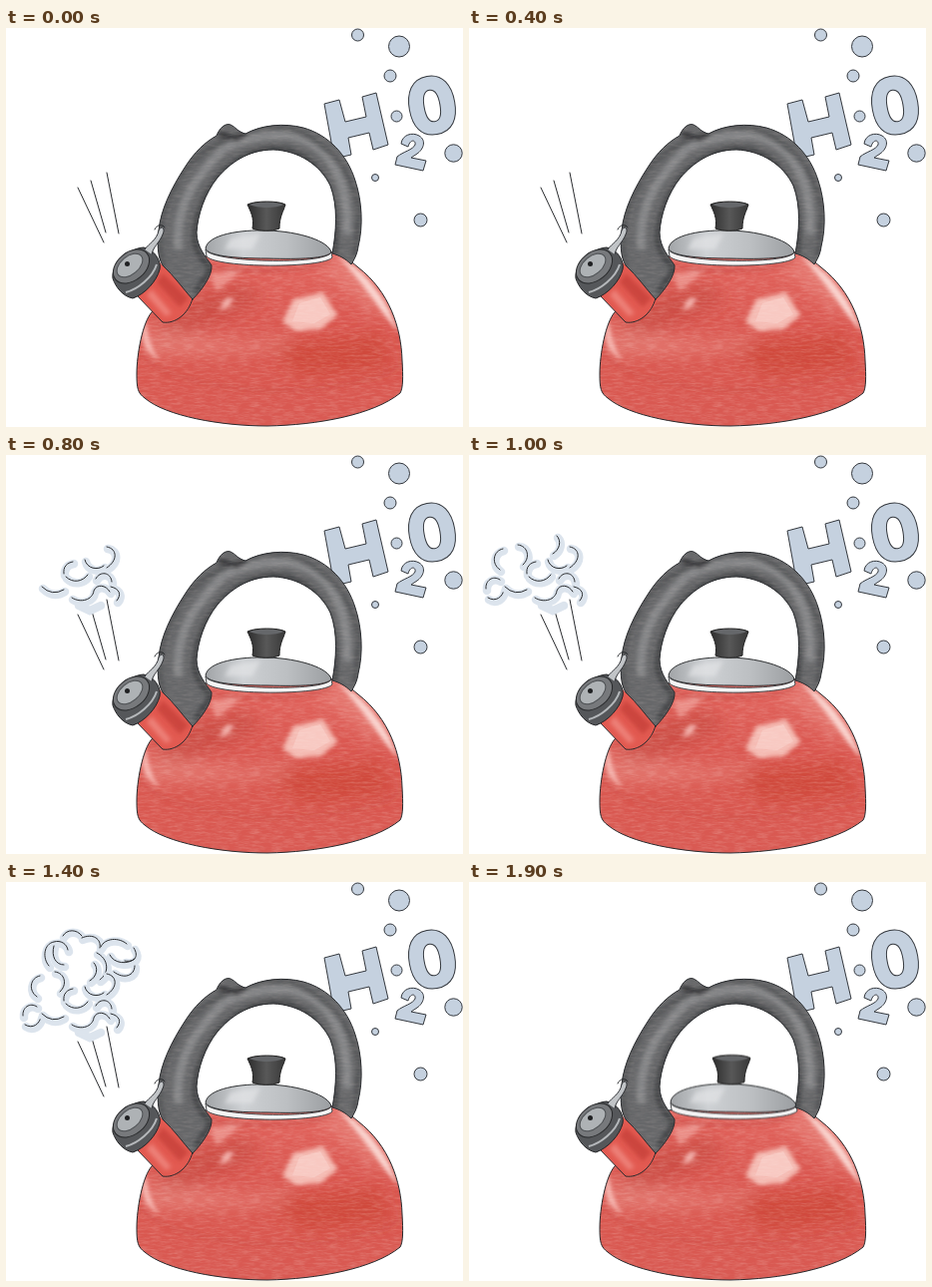
Write an HTML page that moves like this. It is 458x400 px and loops after 2 s.

```html
<!DOCTYPE html>
<html lang="en">
<head>
<meta charset="utf-8">
<title>Whistling kettle</title>
<style>
html, body { margin: 0; width: 100%; height: 100%; overflow: hidden; background: #fff; }
svg { display: block; width: 458px; height: 400px; }
.ink { fill: none; stroke: #292b2e; stroke-width: 1; stroke-linecap: round; stroke-linejoin: round; }
.water { fill: #c5d1df; stroke: #34383e; stroke-width: 1; stroke-linejoin: round; }
.puff { fill: none; stroke: #dce4ed; stroke-width: 8.5; stroke-linecap: round; }
.soft { filter: url(#soft); }
.mid { filter: url(#mid); }
.jets, .s1, .s2, .s3, .lid { animation: 2s step-end infinite; }
.jets { animation-name: jets; }
.s1 { animation-name: s1; }
.s2 { animation-name: s2; }
.s3 { animation-name: s3; }
.lid { animation-name: rattle; }
@keyframes jets { 0% { opacity: 1 } 80%, 100% { opacity: 0 } }
@keyframes s1 { 0% { opacity: 0 } 30% { opacity: 1 } 80%, 100% { opacity: 0 } }
@keyframes s2 { 0% { opacity: 0 } 50% { opacity: 1 } 80%, 100% { opacity: 0 } }
@keyframes s3 { 0% { opacity: 0 } 65% { opacity: 1 } 80%, 100% { opacity: 0 } }
@keyframes rattle { 0% { transform: none } 80%, 100% { transform: translate(2px, -.5px) } }
</style>
</head>
<body>
<svg viewBox="0 0 458 400">
<defs>
  <filter id="soft" x="-50%" y="-50%" width="200%" height="200%"><feGaussianBlur stdDeviation="8"/></filter>
  <filter id="mid" x="-50%" y="-50%" width="200%" height="200%"><feGaussianBlur stdDeviation="2"/></filter>
  <!-- Fine watercolour grain -->
  <filter id="wash" x="0" y="0" width="100%" height="100%">
    <feTurbulence type="fractalNoise" baseFrequency=".09 .5" numOctaves="3" seed="4"/>
    <feColorMatrix values="0 0 0 0 1  0 0 0 0 .85  0 0 0 0 .8  1.6 0 0 0 -.6"/>
    <feComposite in2="SourceGraphic" operator="in"/>
  </filter>
  <linearGradient id="red" x1="0" y1="0" x2="0" y2="1">
    <stop offset="0" stop-color="#e2665f"/><stop offset=".4" stop-color="#da5750"/>
    <stop offset=".72" stop-color="#d9574f"/><stop offset="1" stop-color="#d95a53"/>
  </linearGradient>
  <linearGradient id="steel">
    <stop offset="0" stop-color="#a1a4a7"/><stop offset=".3" stop-color="#ced1d4"/>
    <stop offset=".65" stop-color="#bcbfc2"/><stop offset="1" stop-color="#9b9ea1"/>
  </linearGradient>
  <linearGradient id="knob">
    <stop offset="0" stop-color="#2d2d2d"/><stop offset=".5" stop-color="#585858"/><stop offset="1" stop-color="#383838"/>
  </linearGradient>
  <path id="body" d="M200 229C185 240 161 267 146 285C137 295 131 327 131 347C131 361 132 366 139 371C160 389 215 399 262 399C312 398 368 388 395 366C398 361 398 350 397 333C396 300 384 264 353 240C344 232 334 227 324 224Z"/>
  <path id="grip" d="M187 272C177 261 169 249 157 238C151 228 152 215 153 203C155 182 166 160 179 140C189 124 200 114 211 108C214 100 220 95 225 97C230 99 232 104 240 106C256 97 279 95 298 100C323 107 342 127 350 153C357 174 358 199 353 219C352 227 349 232 346 237C340 231 334 228 327 226C331 204 333 179 325 158C315 137 293 123 268 122C242 122 224 136 212 150C199 166 192 188 191 205C191 220 201 230 206 238C207 248 196 263 187 272Z"/>
  <clipPath id="bodyClip"><use href="#body"/></clipPath>
  <clipPath id="gripClip"><use href="#grip"/></clipPath>
  <g id="steam1">
    <path d="M36 132Q46 142 58 135"/><path d="M58 119C57 112 61 108 67 107"/>
    <path d="M60 122C67 129 77 127 82 120"/><path d="M79 105C81 114 92 116 98 111"/>
    <path d="M101 92C112 94 112 106 101 113"/><path d="M90 124C94 116 105 117 106 127"/>
    <path d="M66 143C75 149 87 145 88 136C91 129 100 130 104 137"/><path d="M105 132C114 134 116 140 111 146"/>
  </g>
  <g id="steam2">
    <path d="M34 94C24 96 22 109 31 115"/><path d="M49 90C59 91 62 103 54 110"/>
    <path d="M17 134C16 126 24 120 31 125"/><path d="M19 143C27 148 34 142 35 135"/>
    <path d="M88 81C93 86 91 95 84 99"/>
  </g>
  <g id="steam3">
    <path d="M57 54C61 47 71 47 76 54"/><path d="M43 84C36 76 38 62 48 60C55 58 61 62 62 68"/>
    <path d="M76 56C87 51 96 57 94 66"/><path d="M95 65C99 56 113 55 121 62"/>
    <path d="M128 66C134 75 128 81 119 79"/><path d="M104 73C108 82 122 83 129 77"/>
    <path d="M108 90C118 98 129 94 129 84"/><path d="M91 71C103 77 104 91 94 98"/>
    <path d="M48 64C45 75 50 83 58 83"/>
  </g>
</defs>

<g class="water" role="img" aria-label="H2O">
  <path d="M319 76L334 72L340 94L361 89L357 69L371 65L383 117L368 122L364 105L343 110L346 127L329 131Z"/>
  <path fill-rule="evenodd" transform="rotate(-10 427 78)" d="M427 48C443 48 450 61 450 78C450 95 443 107 427 107C411 107 404 95 404 78C404 61 411 48 427 48ZM427 62C421 62 419 69 419 78C419 88 421 94 427 94C433 94 435 88 435 78C435 69 433 62 427 62Z"/>
  <path d="M396 116C397 107 407 104 414 108C422 113 418 122 412 126L406 130L421 133L418 143L390 137L392 129C398 124 408 122 410 117C411 112 405 111 403 119Z"/>
  <circle cx="352.5" cy="7" r="6"/><circle cx="394" cy="18.5" r="10.5"/><circle cx="385" cy="48" r="6"/>
  <circle cx="391.5" cy="88.5" r="5.5"/><circle cx="370" cy="150" r="3.5"/>
  <circle cx="448.5" cy="125.5" r="8.7"/><circle cx="415.5" cy="192.5" r="6.5"/>
</g>

<use href="#body" fill="url(#red)"/>
<g clip-path="url(#bodyClip)">
  <g class="soft">
    <path fill="#c2423a" opacity=".55" d="M155 287C170 260 205 270 237 254L257 272C224 294 184 298 155 322Z"/>
    <path fill="#cc4433" opacity=".7" d="M258 318L375 306L386 340L300 350Z"/>
    <path fill="#ea8a83" opacity=".6" d="M140 300C179 299 220 323 285 308L281 320C220 331 170 326 140 331ZM308 232L354 236L388 287L365 284Z"/>
  </g>
  <g class="mid">
    <path fill="#f3b0aa" d="M213 283L220 271L229 270L222 281Z"/>
    <path fill="#f1a19a" opacity=".7" d="M205 247L240 240L226 252L210 264Z"/>
    <path fill="#fad4cf" d="M331 228C358 241 382 270 393 304C374 284 360 256 331 228Z"/>
    <path fill="#f6b5af" d="M136 302L141 293C141 309 147 322 153 332C141 326 136 317 136 302Z"/>
    <path fill="none" stroke="#c4473f" stroke-width="2" opacity=".5" d="M133 325C150 347 200 360 256 363C318 365 376 355 397 336"/>
    <path fill="none" stroke="#bd423c" stroke-width="3" opacity=".5" d="M203 238C230 246 300 246 326 234"/>
  </g>
  <path fill="#f5bbb3" d="M288 272L318 265L332 288L315 302L290 304L277 294Z" filter="url(#mid)"/>
  <path fill="#fad3cd" opacity=".6" d="M294 276L315 270L325 287L309 296L287 294Z"/>
  <use href="#body" filter="url(#wash)" opacity=".25"/>
</g>
<use href="#body" class="ink"/>

<g class="lid">
  <path fill="#f4f4f4" stroke="#45474a" d="M200 222C204 235 319 238 326 225L327 230C318 241 212 241 201 229Z"/>
  <path fill="url(#steel)" stroke="#2c2e30" d="M200 221C202 207 235 202 262 203C295 204 324 214 326 225C321 231 296 232 262 231C226 231 202 228 200 221Z"/>
  <path fill="#e5e6e8" opacity=".65" class="mid" d="M225 211L255 206L247 222L219 222Z"/>
  <path fill="url(#knob)" stroke="#222" d="M242 177C249 173 274 173 280 177C278 184 274 189 274 201C267 204 254 204 247 201C249 190 245 184 242 177Z"/>
  <path fill="#65676a" d="M244 177C252 174 271 174 278 177C271 181 252 181 244 177Z"/>
</g>

<path fill="#e25a51" d="M131 268L153 234L190 271C184 284 169 298 157 295Z"/>
<path class="mid" fill="#bd3833" opacity=".6" d="M157 246L183 271L174 280L151 255Z"/>
<path class="mid" fill="#f08a82" opacity=".8" d="M141 268L146 262L166 286L160 289Z"/>
<path class="ink" d="M131 268L157 295C169 297 183 287 187 271"/>

<use href="#grip" fill="#666769"/>
<g clip-path="url(#gripClip)">
  <g class="mid" fill="none">
    <path stroke="#858688" stroke-width="9" d="M173 222C168 179 190 150 217 122C235 111 263 106 285 108C326 116 344 155 342 207"/>
    <path stroke="#434446" stroke-width="6" d="M190 265L206 241C192 229 187 215 190 202C193 172 219 125 267 121C308 121 335 156 329 227"/>
    <path stroke="#505153" stroke-width="4" d="M158 239C149 217 154 177 180 140C199 119 227 110 252 100C294 92 342 126 354 179L350 229"/>
    <path stroke="#343638" stroke-width="5" d="M213 106L231 111L241 106"/>
  </g>
  <use href="#grip" filter="url(#wash)" opacity=".14"/>
</g>
<use href="#grip" class="ink"/>

<path fill="#55575a" stroke="#242527" d="M107 251C105 238 122 221 138 220C149 222 156 234 154 242C151 254 139 267 127 271C117 269 110 260 107 251Z"/>
<path fill="none" stroke="#b5b8bb" stroke-width="2" d="M120 265C132 262 147 250 151 237"/>
<ellipse cx="125.5" cy="239" rx="20.5" ry="14" transform="rotate(-40 125.5 239)" fill="#77797c" stroke="#292a2c"/>
<ellipse cx="124" cy="238" rx="15" ry="9" transform="rotate(-40 124 238)" fill="#aeb2b5" stroke="#4b4e51"/>
<circle cx="121.5" cy="236.5" r="2.5" fill="#202123"/>
<path d="M139 222C143 216 151 213 153 203C156 197 160 201 157 207C154 215 147 220 146 227" fill="#c1c4c7" stroke="#303236"/>
<path class="ink" d="M149 202C151 197 157 196 159 200"/>

<g class="jets ink">
  <path d="M72 160L98 215M85 153L100 205M101 145L113 206"/>
</g>
<g class="s3">
  <use href="#steam3" class="puff" x="1" y="2"/><use href="#steam3" class="ink"/>
</g>
<g class="s2">
  <use href="#steam2" class="puff" x="1" y="2"/><use href="#steam2" class="ink"/>
</g>
<g class="s1">
  <path class="puff" d="M73 151L84 156L95 151"/>
  <use href="#steam1" class="puff" x="1" y="2"/><use href="#steam1" class="ink"/>
</g>
</svg>
</body>
</html>
```
